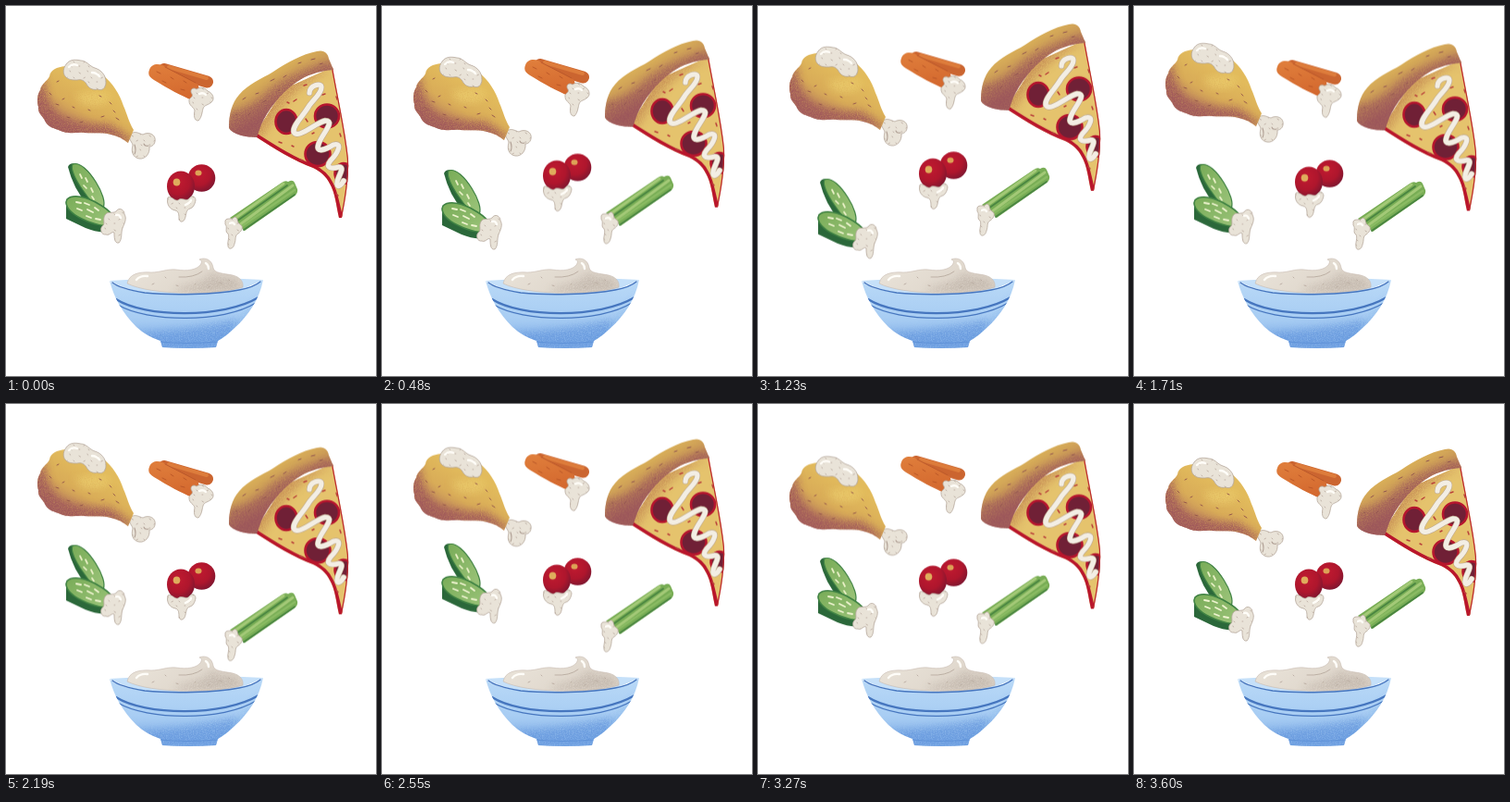
Animation, 400 px wide and 400 px high, one loop 3630 ms. Source, as an HTML page:

```html
<!DOCTYPE html>
<html lang="en">
<head>
<meta charset="utf-8">
<title>Floating snacks and dip</title>
<style>
html, body { margin: 0; width: 100%; height: 100%; overflow: hidden; background: #fff; }
svg { display: block; width: 100vw; height: 100vh; }
.float { animation: 3630ms cubic-bezier(.37, 0, .63, 1) infinite; }
#chicken { animation-name: chicken; }
#carrot { animation-name: carrot; }
#pizza { animation-name: pizza; }
#cucumber { animation-name: cucumber; }
#tomato { animation-name: tomato; }
#celery { animation-name: celery; }
@keyframes chicken { 49% { transform: translateY(-18px) } }
@keyframes carrot {
  31% { transform: translateY(-13px) }
  56% { transform: none }
  79.5% { transform: translateY(-13px) }
}
@keyframes pizza {
  31.4% { transform: translateY(-30px) }
  55.1% { transform: none }
  79.9% { transform: translateY(-15.5px) }
}
@keyframes cucumber {
  30.5% { transform: translateY(17.5px) }
  66.1% { transform: translateY(-20px) }
}
@keyframes tomato {
  22% { transform: translateY(-17.5px) }
  60.6% { transform: none }
  78.5% { transform: translateY(-8.5px) }
}
@keyframes celery {
  31.7% { transform: translateY(-14.5px) }
  62% { transform: translateY(15.5px) }
  79.9% { transform: translateY(-7px) }
}
.line { fill: none; stroke-linecap: round; stroke-linejoin: round; }
.dip { fill: url(#dip); stroke: #b5a89b; stroke-width: .8; stroke-linejoin: round; }
.shine { fill: none; stroke: #fffdf8; stroke-width: 2.4; stroke-linecap: round; }
.shade { filter: url(#grain); }
</style>
</head>
<body>
<svg viewBox="0 0 400 400" xmlns="http://www.w3.org/2000/svg">
<defs>
  <filter id="grain" x="-20%" y="-20%" width="140%" height="140%">
    <feGaussianBlur in="SourceGraphic" stdDeviation="4" result="soft"/>
    <feTurbulence type="fractalNoise" baseFrequency=".8" numOctaves="2" seed="4"/>
    <feColorMatrix values="0 0 0 0 0  0 0 0 0 0  0 0 0 0 0  1.6 0 0 0 0" result="noise"/>
    <feComposite in="soft" in2="noise" operator="in"/>
  </filter>
  <pattern id="dip" width="19" height="17" patternUnits="userSpaceOnUse">
    <rect width="19" height="17" fill="#e9e3d8"/>
    <path class="line" d="M3 4l1.5 1M12 2l.5 1M8 10l1.4-.8M16 9l.8 1M3 14h.8M13 14l1 .7" stroke="#b5a59a" stroke-width=".8"/>
  </pattern>
  <linearGradient id="meat" x1=".75" y1=".15" x2=".2" y2=".9">
    <stop offset=".2" stop-color="#e2bb5c"/><stop offset=".55" stop-color="#d9ac58"/><stop offset="1" stop-color="#b0705f"/>
  </linearGradient>
  <linearGradient id="crust" gradientUnits="userSpaceOnUse" x1="287" y1="72" x2="306" y2="104">
    <stop offset="0" stop-color="#d8ae58"/><stop offset=".5" stop-color="#cb9a58"/><stop offset="1" stop-color="#a9685c"/>
  </linearGradient>
  <linearGradient id="orange" x1="0" y1="0" x2=".2" y2="1">
    <stop offset="0" stop-color="#e07f3c"/><stop offset="1" stop-color="#d4692f"/>
  </linearGradient>
  <radialGradient id="red" cx=".4" cy=".34" r=".7">
    <stop offset="0" stop-color="#c01a30"/><stop offset=".6" stop-color="#af162d"/><stop offset="1" stop-color="#7c1630"/>
  </radialGradient>
  <linearGradient id="slice" x1="0" y1="0" x2="1" y2="1">
    <stop offset="0" stop-color="#79ac58"/><stop offset="1" stop-color="#9cc47a"/>
  </linearGradient>
  <linearGradient id="blue" x1="0" y1="0" x2="0" y2="1">
    <stop offset="0" stop-color="#b9d9f7"/><stop offset=".55" stop-color="#a8cdf3"/><stop offset="1" stop-color="#86b3ea"/>
  </linearGradient>
  <linearGradient id="cream" x1="0" y1="0" x2="1" y2=".4">
    <stop offset="0" stop-color="#ebe5db"/><stop offset="1" stop-color="#dcd3c8"/>
  </linearGradient>
  <path id="meatShape" d="M64 65C55 66 48 69 47 76C45 81 38 84 37 91C34 95 33 103 35 109C34 116 40 119 42 124C46 132 53 132 59 135C68 139 76 136 84 137C96 138 107 136 117 140C124 142 128 145 132 148L138 134C133 126 131 117 127 108C123 95 115 83 105 75C92 65 76 62 64 65Z"/>
  <path id="crustShape" d="M241 132C241 117 244 105 252 96C262 84 276 79 289 71C304 61 320 52 336 49C344 47 348 51 349 57L354 69C338 70 324 75 313 83C296 95 283 113 276 128L271 142C260 142 245 139 241 132Z"/>
  <path id="cheeseShape" d="M353 66C358 95 367 135 370 165C371 185 367 210 363 229L360 229C357 216 356 202 350 192C346 184 340 179 332 175C312 168 290 154 268 140L300 90Z"/>
  <path id="bowlShape" d="M112 297C117 303 128 307 150 310C180 313 225 312 252 307Q270 303 278 296C274 317 262 335 247 348Q238 357 229 362L227 369Q197 371 169 369L167 362Q152 357 141 347C126 332 117 316 112 297Z"/>
  <path id="mound" d="M131 300C133 290 143 287 157 288C167 288 174 284 184 285C196 287 206 285 210 280C212 277 212 275 209 274C216 271 223 275 224 283C225 289 235 289 245 291C253 293 257 298 256 304C228 313 157 313 131 300Z"/>
  <path id="swirl" class="line" d="M328 94C328 86 341 82 341 88C341 95 332 101 327 109C321 119 310 129 311 136C315 145 335 126 345 124C357 124 341 139 338 149C334 160 346 155 354 150C365 147 358 160 351 167C344 176 353 176 360 174C368 174 356 188 358 193C359 197 363 193 365 189"/>
  <clipPath id="meatClip"><use href="#meatShape"/></clipPath>
  <clipPath id="crustClip"><use href="#crustShape"/></clipPath>
  <clipPath id="cheeseClip"><use href="#cheeseShape"/></clipPath>
  <clipPath id="bowlClip"><use href="#bowlShape"/></clipPath>
  <clipPath id="moundClip"><use href="#mound"/></clipPath>
</defs>

<g id="bowl">
  <path d="M112 297Q195 291 278 296Q240 316 195 314Q145 315 112 297Z" fill="#c5e0f9"/>
  <use href="#mound" fill="url(#cream)" stroke="#c8bbb0" stroke-width=".6"/>
  <g clip-path="url(#moundClip)">
    <path class="shade" d="M190 303Q216 299 222 288Q231 294 248 294L257 306Q230 312 180 309Z" fill="#a99b91" opacity=".45"/>
    <path class="line" d="M187 293Q203 294 212 287M158 301l2-1M172 293l1 1M184 302l2 .5M204 301l1-1M231 299l2 .5M219 304l1-.5M241 296l1 1" stroke="#b3a59a" stroke-width=".8"/>
  </g>
  <path class="shine" d="M141 296Q145 291 153 292M216 278Q219 280 219 284"/>
  <use href="#bowlShape" fill="url(#blue)"/>
  <g clip-path="url(#bowlClip)">
    <path class="shade" d="M138 352Q195 351 250 338L240 372H150Z" fill="#5388d6" opacity=".6"/>
    <path class="shade" d="M280 302Q263 338 226 363L250 365Z" fill="#5c94dc" opacity=".45"/>
    <path class="line" d="M119 317C150 337 235 338 273 315" stroke="#4676bf" stroke-width="2.2"/>
    <path class="line" d="M121 323C152 342 235 343 270 321" stroke="#4676bf" stroke-width="1.3"/>
    <path class="line" d="M166 363Q197 366 228 363" stroke="#5f92d8" stroke-width="1"/>
  </g>
  <path class="line" d="M115 299C121 304 132 307 150 310C180 313 225 312 252 307Q268 304 275 298" stroke="#4676bf" stroke-width="1.5"/>
</g>

<g id="chicken" class="float">
  <path class="dip" d="M134 139C139 134 144 138 148 139C153 136 160 138 161 143C162 148 159 152 155 152C156 160 150 166 144 165C137 164 135 157 137 151C137 147 132 145 134 139Z"/>
  <path class="line" d="M139 150Q141 156 139 160M154 151Q150 152 149 149" stroke="#ad9c91" stroke-width="1.1"/>
  <use href="#meatShape" fill="url(#meat)"/>
  <g clip-path="url(#meatClip)">
    <path class="shade" d="M43 76Q41 101 58 117Q81 129 112 127L141 147L70 149L28 128L27 91Z" fill="#9c535a" opacity=".85"/>
    <path class="shade" d="M75 96Q94 89 112 96Q113 107 94 108Q78 108 75 96Z" fill="#efd272" opacity=".7"/>
    <path class="line" d="M47 94l2 2M54 106l3 1M46 112l2 2M66 120l3 1M61 101l2-1M80 126l3-1M89 112l2 1M103 120l3-1M112 104l2 2M101 97l2 1M119 121l3 2M72 109l2 1M116 113l2 2M55 82l2-1" stroke="#96594c" stroke-width="1"/>
  </g>
  <path class="dip" d="M65 63C69 57 76 58 81 59C87 59 90 65 96 67C103 69 108 75 108 82C108 89 104 92 99 90C95 91 91 90 88 86C85 80 81 79 77 80C72 80 67 80 64 76C61 72 62 67 65 63Z"/>
  <path class="shine" d="M68 66Q72 62 77 64M93 72Q98 72 101 76"/>
</g>

<g id="carrot" class="float">
  <path class="line" d="M171 68.500L217.500 82" stroke="#cb6530" stroke-width="13"/>
  <path class="line" d="M176 66L217 78" stroke="#dd7c3b" stroke-width="4"/>
  <path d="M155 69C157 63 163 62 169 64L205 83C212 87 209 101 201 102C190 97 176 90 160 80C155 77 153 74 155 69Z" fill="url(#orange)"/>
  <path class="line" d="M172 66L205 83" stroke="#b7552a" stroke-width=".9"/>
  <path class="line" d="M163 71l4 2M178 77l3 2M169 81l4 2M189 90l4 1M192 81l3 2" stroke="#b75528" stroke-width=".9"/>
  <path class="dip" d="M201 95C198 91 202 87 206 90C210 87 215 88 218 92C224 94 226 101 222 104C219 107 214 107 213 111C212 114 212 120 208 124C203 124 203 118 204 113C203 109 198 108 198 103C197 99 203 99 201 95Z"/>
  <path class="shine" d="M209 95Q213 93 216 96" stroke-width="1.8"/>
</g>

<g id="pizza" class="float">
  <use href="#cheeseShape" fill="#e5c36d"/>
  <g clip-path="url(#cheeseClip)">
    <path class="shade" d="M353 70Q310 82 277 142L256 140L298 72Z" fill="#b8744a" opacity=".6"/>
    <g fill="#702036" stroke="#b5152e" stroke-width="2.600">
      <ellipse cx="303" cy="125" rx="11.5" ry="13"/>
      <ellipse cx="347" cy="119" rx="13" ry="12.5"/>
      <ellipse cx="337" cy="160" rx="13.5" ry="13"/>
      <ellipse cx="365" cy="181" rx="9.5" ry="11"/>
    </g>
    <path class="line" d="M268 140C290 154 312 168 332 175C340 179 346 184 350 192C356 202 357 216 361 229" stroke="#b9162c" stroke-width="7"/>
    <path class="line" d="M353 66C358 95 367 135 370 165C371 185 367 210 363 229" stroke="#bd2730" stroke-width="2.500"/>
    <path class="line" d="M311 103l3-2M324 122l2 3M295 147l3 1M309 151l2 1M331 138l2-1M357 98l1 3M361 138l1 3M346 190l3 2M318 166l3 1M342 96l3-1M322 86l3-1M304 104l2 1M357 203l2 2" stroke="#b9403a" stroke-width="1.5"/>
  </g>
  <use href="#crustShape" fill="url(#crust)"/>
  <g clip-path="url(#crustClip)">
    <path class="shade" d="M239 114Q263 113 287 88Q316 68 353 59V76Q310 79 272 148L236 143Z" fill="#96505a" opacity=".7"/>
    <path class="line" d="M256 101l3-2M270 95l3-1M286 81l4-2M300 77l3-2M316 62l3-1M330 58l4-1M262 118l2-2M278 104l3-2M294 92l2-1M248 118l2-1M339 63l3-1" stroke="#925650" stroke-width="1"/>
  </g>
  <use href="#swirl" stroke="#bfa98f" stroke-width="6.400"/>
  <use href="#swirl" stroke="#f3eee4" stroke-width="5.200"/>
</g>

<g id="cucumber" class="float">
  <path d="M67 174C68 170 73 169 77 172L106 214Q107 221 102 221Q94 219 87 213Q73 198 67 174Z" fill="#2b683a"/>
  <path d="M72 171C80 168 90 179 97 190C104 201 108 213 105 218C100 220 90 210 83 199C76 189 69 176 72 171Z" fill="url(#slice)" stroke="#3f8243" stroke-width="1.2"/>
  <path class="line" d="M80 182l2 4M86 186l2 4M84 194l3 3M92 197l2 4M93 206l2 3" stroke="#e9f0c6" stroke-width="1.7"/>
  <path d="M65 210C68 203 87 205 101 214C112 220 120 231 116 239C112 247 99 245 86 240L65 230Z" fill="#2b683a"/>
  <path d="M66 209C72 203 87 206 100 214C113 221 120 230 115 235C109 240 94 236 82 230C71 225 62 216 66 209Z" fill="url(#slice)" stroke="#3f8243" stroke-width="1.500"/>
  <path class="line" d="M76 212l5 1M85 213l5 2M77 219l5 2M96 218l4 3M87 227l5 2M97 230l5 1M88 220l6 3" stroke="#eef3cf" stroke-width="1.8"/>
  <path class="dip" d="M107 226C110 221 115 225 119 222C122 217 128 220 128 225C131 230 128 235 126 240C124 245 126 252 122 256C117 257 117 250 117 245C114 243 112 249 108 247C103 248 101 241 104 238C108 236 104 231 107 226Z"/>
  <path class="shine" d="M119 226Q123 225 124 229" stroke-width="1.8"/>
</g>

<g id="tomato" class="float">
  <circle cx="211.500" cy="186" r="14.800" fill="url(#red)"/>
  <ellipse cx="208" cy="180.500" rx="3.500" ry="3" fill="#dda256"/>
  <ellipse cx="189" cy="195" rx="15" ry="16.500" fill="url(#red)"/>
  <ellipse cx="184.500" cy="190.500" rx="3.800" ry="4" fill="#dfac5c"/>
  <path class="dip" d="M175 207C179 205 182 211 186 210C190 206 195 212 198 208C201 204 205 206 205 210C204 215 202 218 199 219C195 220 195 224 194 228C193 233 189 235 187 231C187 226 187 222 183 221C177 220 173 214 175 207Z"/>
  <path class="shine" d="M194 215Q199 213 200 210" stroke-width="1.6"/>
</g>

<g id="celery" class="float">
  <path d="M242 229L298 191Q302 188 305 190Q310 187 312 191L315 198Q316 203 311 206L258 243Z" fill="#78ad55"/>
  <path class="line" d="M247 230L300 192M252 237L310 194" stroke="#a3c977" stroke-width="3"/>
  <path class="line" d="M249 233L304 194M257 242L312 204" stroke="#498541" stroke-width="1.7"/>
  <path class="line" d="M255 238L312 199" stroke="#8abb63" stroke-width="2.5"/>
  <path class="dip" d="M237 232C239 228 244 232 247 228C252 229 249 234 253 236C258 239 254 244 251 246C247 248 249 252 247 257C246 263 240 264 240 259C239 255 242 250 240 246C236 244 240 239 237 236Z"/>
  <path class="shine" d="M242 235Q245 233 247 236" stroke-width="1.7"/>
</g>
</svg>
</body>
</html>
```
